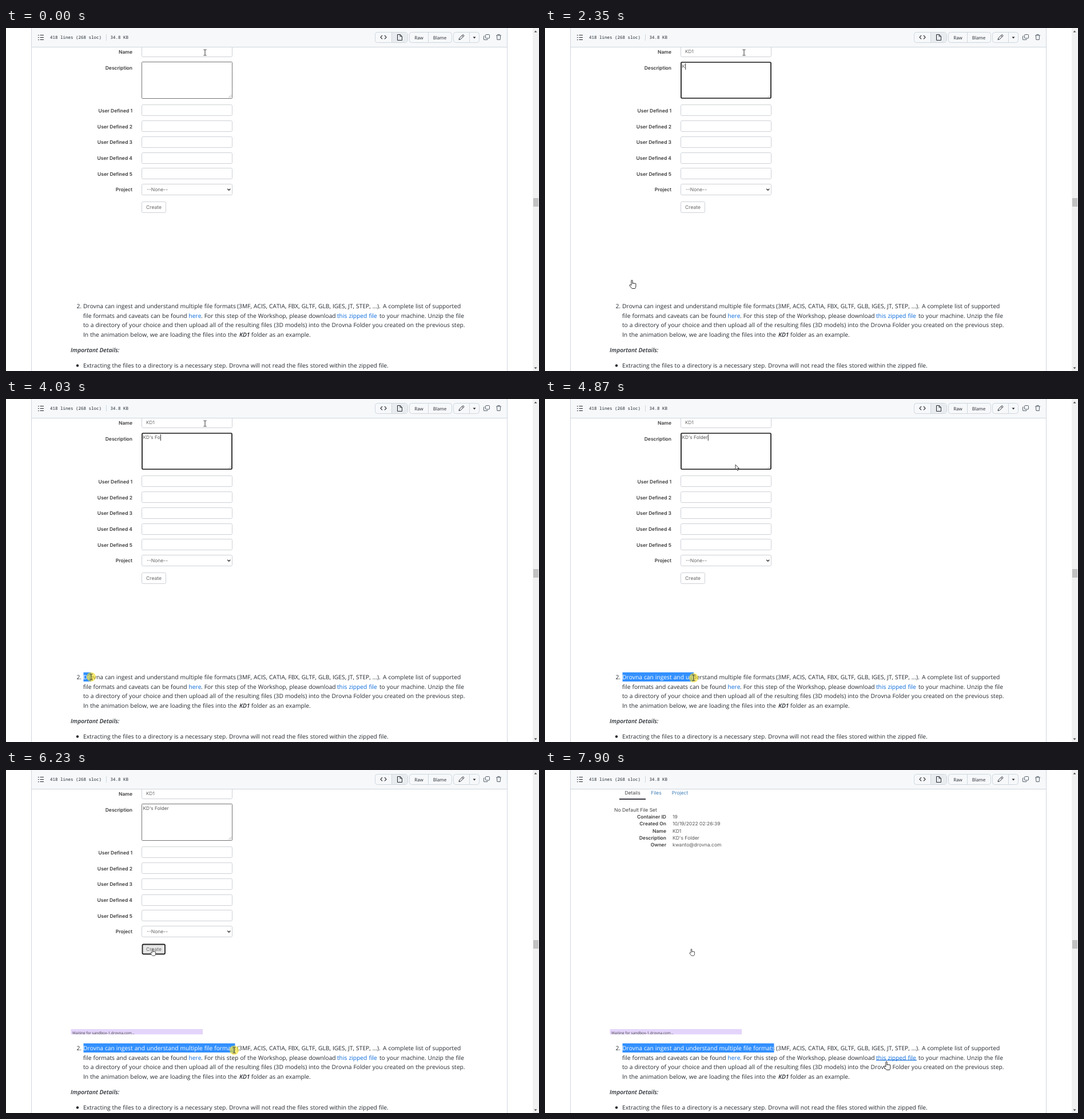
Recreate the animation shown at these times as an HTML page with a canvas. Size 932 by 601 pixels, loop 8 s.

```html
<!DOCTYPE html>
<html lang="en">
<head>
<meta charset="utf-8">
<title>Folder form</title>
<style>
html, body { margin: 0; width: 100%; height: 100%; overflow: hidden; background: #fff; }
canvas { display: block; width: 932px; height: 601px; }
</style>
</head>
<body>
<canvas id="stage" width="932" height="601"></canvas>
<script>
const c = document.getElementById('stage').getContext('2d');
const LOOP = 8000, STEP = 168;
const BODY = '10.25px "Open Sans", "Noto Sans", sans-serif';
const STRONG = 'italic 600 ' + BODY;
const FORM = '8.5px Inter, "Open Sans", sans-serif';
const FIELD = '8.2px Inter, "Open Sans", sans-serif';
const LABEL = '600 ' + FORM;
const MONO = '7.5px "Noto Sans Mono", "DejaVu Sans Mono", monospace';
const INK = '#24292f', LINK = '#0969da', RULE = '#d0d7de', GREY = '#57606a';
const EDGE = '#cdd1d6', DARK = '#3c3c3c';

const NAME = 'KD1', NOTE = "KD's Folder";
const FIRST = 'Drovna can ingest and understand multiple file formats';
const TYPED = [[14, 1], [15, 2], [17, 3], [19, 4], [21, 5], [22, 6], [23, 7], [25, 8], [26, 9], [27, 11]];

// Paths: step, x, y
const INNER = [[27, 348, 43], [28, 346, 70], [30, 320, 160], [32, 280, 268], [33, 264.5, 302], [35, 256, 313]];
const OUTER = [[8, 500, 570], [9, 440, 538], [10, 370, 503], [11, 300, 473], [12, 240, 455], [13, 192, 445],
  [14, 152, 441], [16, 150, 443], [17, 146, 456], [18, 141, 476], [19, 137, 487], [23, 139, 487], [24, 149, 487],
  [25, 165, 487], [27, 207, 488], [28, 230, 488], [30, 290, 489], [32, 360, 490], [33, 391, 490], [34, 397, 491],
  [35, 399, 491], [42, 399, 491], [43, 412, 494], [44, 455, 505], [45, 520, 516], [46, 574, 512], [47, 597, 510]];

const HAND = new Path2D('M4 10V1.9a1.1 1.1 0 0 1 2.2 0V7q0-1.1 1-1.1 1 0 1 1.1 0-.9 1-.9 1 0 1 1.1 0-.7.9-.7.9 0 .9 1V11q0 3-1.5 4.5H5.2L1.2 10.8Q.4 9.6 1.3 9q.9-.5 1.8.4z');
const ARROW = new Path2D('M0 0V10L2.3 7.9 3.9 11.6 5.5 10.9 3.9 7.3H7z');

function along(path, k) {
  let i = 0;
  while (i < path.length - 2 && path[i + 1][0] <= k) i++;
  const [a, x, y] = path[i], [b, u, v] = path[i + 1];
  const p = Math.min(1, Math.max(0, (k - a) / (b - a)));
  return [x + (u - x) * p, y + (v - y) * p];
}

function text(s, x, y, font = BODY, color = INK, align = 'left') {
  c.font = font;
  c.wordSpacing = font === BODY ? '0.35px' : '0px';
  c.fillStyle = color;
  c.textAlign = align;
  c.fillText(s, x, y);
}

function rect(x, y, w, h, color) {
  c.fillStyle = color;
  c.fillRect(x, y, w, h);
}

function box(x, y, w, h, r, stroke, fill, width = 1) {
  c.beginPath();
  c.roundRect(x, y, w, h, r);
  if (fill) { c.fillStyle = fill; c.fill(); }
  c.strokeStyle = stroke;
  c.lineWidth = width;
  c.stroke();
}

function line(d, color = GREY, width = 1) {
  c.strokeStyle = color;
  c.lineWidth = width;
  c.stroke(new Path2D(d));
}

function solid(d, color) {
  c.fillStyle = color;
  c.fill(new Path2D(d));
}

function pointer(shape, x, y, scale = 1) {
  c.save();
  c.translate(x, y);
  c.scale(scale, scale);
  c.fillStyle = '#fff';
  c.fill(shape);
  c.strokeStyle = '#2c2c2c';
  c.lineWidth = 1;
  c.stroke(shape);
  c.restore();
}

const hand = (x, y, s = 1) => pointer(HAND, x - 5.1 * s, y, s);

function ibeam(x, y) {
  line(`M${x - 2.5} ${y - 5}h2l.5.5.5-.5h2M${x} ${y - 4.5}v9M${x - 2.5} ${y + 5}h2l.5-.5.5.5h2`, '#333', 1);
}

function header() {
  rect(44, 0, 833, 33, '#f6f8fa');
  rect(44, 33, 833, 1, RULE);
  line('M59.5 12.5h6.5M59.5 16.5h6.5M59.5 20.5h6.5', INK);
  for (const y of [12, 16, 20]) rect(56, y, 1.5, 1.2, INK);
  text('418 lines (268 sloc)', 77, 18.7, MONO);
  rect(175, 11, 1, 11, RULE);
  text('34.8 KB', 182.5, 18.7, MONO);

  box(645.5, 7.5, 57, 18, 4, RULE, '#f6f8fa');
  rect(674, 8, 28, 17, '#e9ecef');
  rect(674, 8, 1, 17, RULE);
  line('M658 13l-3 3.2 3 3.2M662 13l3 3.2-3 3.2', INK, 1.1);
  line('M684.5 11.5h5l3 3v7h-8zM689.2 11.7v3h3', INK, 1);
  box(705.5, 7.5, 74, 18, 4, RULE, '#f6f8fa');
  rect(738, 8, 1, 17, RULE);
  const small = '500 8px "Open Sans", "Noto Sans", sans-serif';
  text('Raw', 722, 19.7, small, INK, 'center');
  text('Blame', 758.5, 19.7, small, INK, 'center');
  box(782.5, 7.5, 45, 18, 4, RULE, '#f6f8fa');
  rect(810, 8, 1, 17, RULE);
  line('M792 20.5l.8-2.8 5.6-5.6q.8-.7 1.6 0l.5.5q.7.8 0 1.6l-5.6 5.6zM797.3 13.2l2.1 2.1', INK, 1);
  solid('M816.5 15.5h5l-2.5 3z', INK);
  box(838.5, 11.5, 7, 6.5, 1, GREY);
  line('M837 14h-1q-.6 0-.6.6v5.4q0 .6.6.6h5.4q.6 0 .6-.6v-1', GREY);
  line('M857 13h9M859.8 12.8v-1.4h3.4v1.4M858.3 13.3l.6 7.2h5.2l.6-7.2', GREY);
}

function frame() {
  rect(44, 0, 1, 601, RULE);
  rect(876, 0, 1, 601, RULE);
  rect(921, 0, 11, 601, '#f1f1f1');
  rect(922, 298, 9, 15, '#c1c1c1');
  solid('M923.5 7.5h5l-2.5-3z', '#505050');
  solid('M923.5 594.5h5l-2.5 3z', '#505050');
}

function form(k) {
  const labels = ['Name', 'Description'];
  labels.forEach((s, i) => text(s, 221, 45 + i * 27.8, LABEL, DARK, 'right'));
  for (let i = 1; i <= 5; i++) {
    const y = 106.75 + i * 27.75;
    text('User Defined ' + i, 221, y + 13.3, LABEL, DARK, 'right');
    box(237.5, Math.round(y - .25) + .5, 158, 19, 2, EDGE);
  }
  text('Project', 221, 286.4, LABEL, DARK, 'right');
  box(237.5, 273.5, 158, 19, 2, EDGE);
  text('--None--', 246, 286.3, FORM, '#666');
  line('M387.3 281.7l2.5 2.6 2.5-2.6', '#333', 1.3);

  const inName = k >= 2 && k < 7, inNote = k >= 7 && k < 36;
  if (inName) box(236.8, 29, 159.5, 22.3, 3, '#cfe4fb', null, 2.4);
  box(237.5, 30.5, 158, 20, 2, inName ? '#80bdff' : k === 7 ? '#a3cdf3' : EDGE);
  const name = NAME.slice(0, Math.max(0, k - 2));
  text(name, 245, 44, FIELD, '#666');
  if (inName) rect(245.5 + c.measureText(name).width, 36, 1, 10, '#555');

  if (inNote) box(238, 60, 157, 63, 1.5, '#151515', null, 1.7);
  else box(237.5, 59.5, 158, 64, 1, '#747474');
  line('M389.5 121.8l4.6-4.6M392.3 121.8l1.8-1.8', '#888', .7);
  let count = 0;
  for (const [at, n] of TYPED) if (k >= at) count = n;
  const note = NOTE.slice(0, count);
  text(note, 239.5, 70.2, FIELD, '#555');
  const blink = (k >= 10 && k < 13) || (k >= 30 && k < 33);
  if (inNote && !blink) rect(239.7 + c.measureText(note).width, 62, 1, 11, '#333');

  if (k >= 36) box(238.5, 305.5, 39.5, 17, 2, '#222', '#e6e6e6', 1.8);
  else box(237.5, 304.5, 42, 19, 2, EDGE, k === 35 ? '#eee' : '#fff');
  text('Create', 258.5, 317, FORM, '#666', 'center');
}

function details() {
  text('Details', 153, 43.2, FORM, '#444', 'center');
  text('Files', 194.5, 43.2, FORM, '#3f7fb5', 'center');
  text('Project', 236, 43.2, FORM, '#3f7fb5', 'center');
  rect(130, 50, 46, 2, '#3a3a42');
  text('No Default File Set', 121, 73, FORM, '#444');
  const rows = [['Container ID', '19'], ['Created On', '10/19/2022 02:26:39'], ['Name', NAME],
    ['Description', NOTE], ['Owner', 'kwanto@drovna.com']];
  rows.forEach(([key, value], i) => {
    const y = 85.3 + i * 12.1;
    text(key, 212, y, LABEL, DARK, 'right');
    text(value, 223, y, FORM, '#555');
  });
}

function status() {
  c.save();
  c.beginPath();
  c.rect(113.5, 454, 230.5, 9.3);
  c.clip();
  rect(113, 454, 232, 10, '#e4d4fb');
  text('Waiting for sandbox-1.drovna.com...', 116, 462.8, '6.45px "Open Sans", sans-serif', '#444');
  c.restore();
}

function article() {
  text('2.', 132, 491, BODY, INK, 'right');
  const runs = [
    [135, 491, FIRST],
    [404, 491, '(3MF, ACIS, CATIA, FBX, GLTF, GLB, IGES, JT, STEP, ...).'],
    [659, 491, 'A complete list of supported'],
    [135, 507.5, 'file formats and caveats can be found'],
    [319.5, 507.5, 'here', LINK],
    [341, 507.5, '. For this step of the Workshop, please download'],
    [579, 507.5, 'this zipped file', LINK],
    [653, 507.5, 'to your machine. Unzip the file'],
    [135, 524, 'to a directory of your choice and then upload all of the resulting files (3D models) into the Drovna Folder you created on the previous step.'],
    [135, 540.5, 'In the animation below, we are loading the files into the'],
    [429, 540.5, 'folder as an example.'],
    [135, 595, 'Extracting the files to a directory is a necessary step. Drovna will not read the files stored within the zipped file.']
  ];
  for (const [x, y, s, color] of runs) text(s, x, y, BODY, color);
  text(NAME, 408, 540.5, STRONG);
  text('Important Details:', 113, 567.5, STRONG);
  c.beginPath();
  c.arc(125, 591.5, 2.2, 0, 7);
  c.fillStyle = INK;
  c.fill();
}

function selection(k) {
  if (k < 22) return;
  const end = k >= 35 ? 400.5 : along(OUTER, k)[0];
  c.save();
  c.beginPath();
  c.rect(135.5, 479, end - 135.5, 16);
  c.clip();
  rect(135, 478, 270, 18, '#3390ff');
  text(FIRST, 135, 491, BODY, '#fff');
  c.restore();
}

function mice(k) {
  const [x, y] = along(INNER, k);
  if (k < 28) ibeam(x, y);
  else if (k < 35) pointer(ARROW, x, y, .9);
  else hand(x, y, .8);

  if (k < 8) return;
  const [u, v] = along(OUTER, k);
  if (k >= 21 && k < 41) {
    c.beginPath();
    c.arc(u, v, 8, 0, 7);
    c.fillStyle = 'rgba(245, 222, 40, .65)';
    c.fill();
  }
  const overImage = k < 18 && v < 463;
  if (overImage || k >= 46) hand(u, v);
  else ibeam(u, v);
}

function draw(t) {
  const k = Math.floor((t + 17) / STEP);
  c.textRendering = 'geometricPrecision';
  c.fontKerning = 'none';
  rect(0, 0, 932, 601, '#fff');
  if (k < 44) form(k);
  else details();
  header();
  frame();
  if (k >= 37) status();
  article();
  selection(k);
  if (k >= 46) rect(579, 508, 71, 1, LINK);
  mice(k);
}

const start = performance.now();
function tick() {
  draw((performance.now() - start) % LOOP);
  requestAnimationFrame(tick);
}
tick();
</script>
</body>
</html>
```
